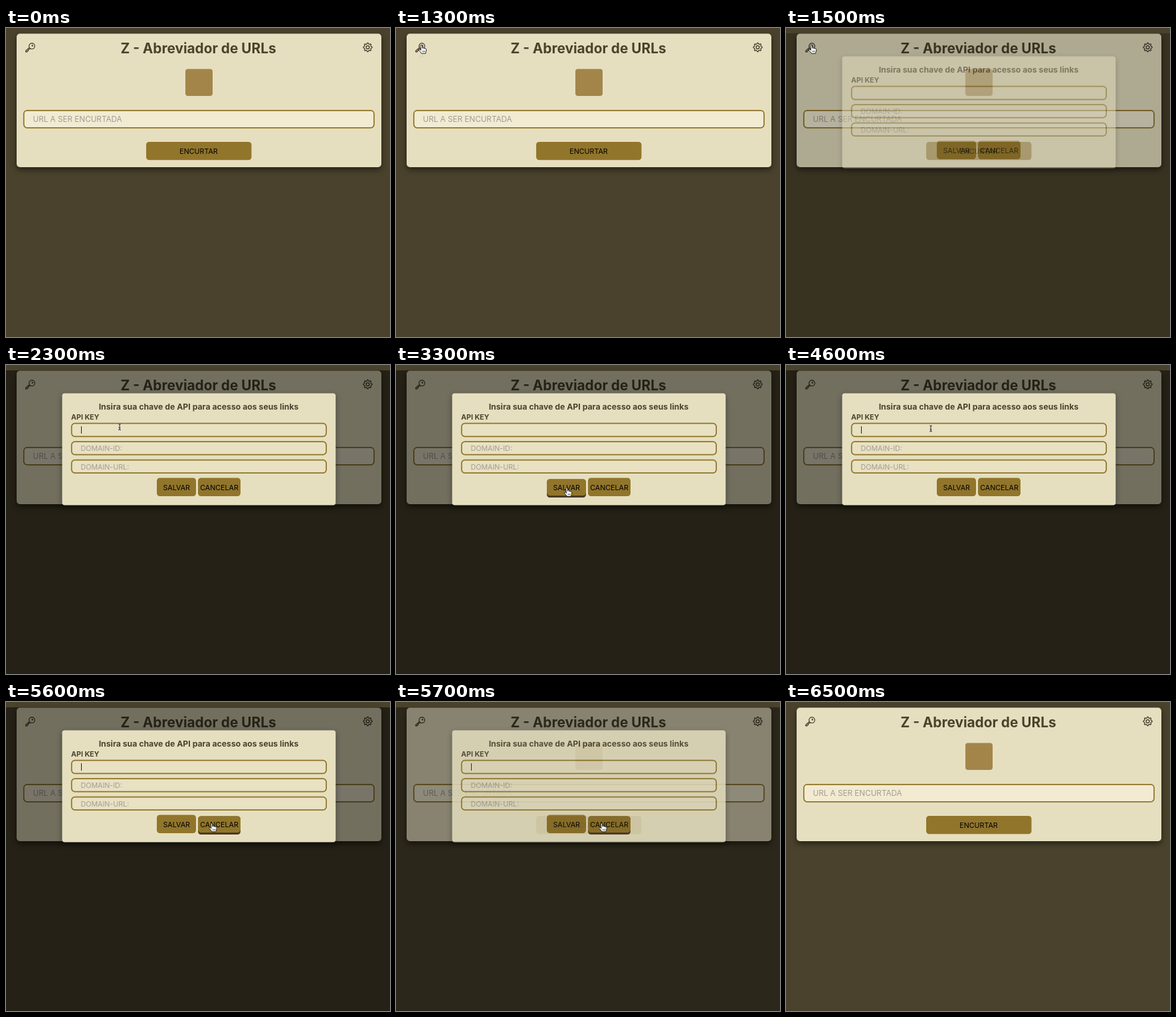
Write an HTML page that moves like this. It is 578 by 464 pixels and loops after 7200 ms.

```html
<!DOCTYPE html>
<html lang="pt">
<head>
<meta charset="utf-8">
<title>Abreviador</title>
<style>
html, body { margin: 0; width: 100%; height: 100%; overflow: hidden; background: #4a422c; }
svg { display: block; width: 578px; height: 464px; font-family: Inter, "Liberation Sans", sans-serif; font-size: 10.7px; }
.card { fill: #e6dfbf; }
#page .card { filter: drop-shadow(0 4px 4px rgba(0,0,0,.5)); }
#modal .card { filter: drop-shadow(0 3px 4px rgba(0,0,0,.4)); }
.field { fill: #e8e1c2; stroke: #8f7428; stroke-width: 1.7; }
.hint { fill: #a19c97; }
.head { fill: #4a422c; font-weight: 700; }
.btn { fill: #91752b; }
.edge { fill: #4a3a24; }
.mid { text-anchor: middle; }
.icon { fill: none; stroke: #3a3424; stroke-width: 1.15; stroke-linejoin: round; stroke-linecap: round; }
</style>
</head>
<body>
<svg viewBox="0 0 578 464">
  <rect width="578" height="464" fill="#4a422c"/>
  <g id="page">
    <rect class="card" x="16" y="8.5" width="549" height="200.5" rx="5"/>
    <text class="head mid" x="289.5" y="37.7" font-size="20.8">Z - Abreviador de URLs</text>
    <g class="icon">
      <circle cx="39" cy="27.2" r="4.3"/>
      <path d="M35.2 29.4L29.7 34.2V35.8H32V34.2H33.6V32.6L36.6 30.9"/>
      <circle cx="39.7" cy="26.5" r=".6"/>
    </g>
    <g class="icon">
      <path id="gear"/>
      <circle cx="544.5" cy="29" r="2.4"/>
    </g>
    <rect x="270" y="61.5" width="41" height="40.5" rx="4" fill="#a3854a"/>
    <rect class="field" x="26.8" y="123.8" width="527.2" height="26" rx="5" style="fill:#f2ebd1"/>
    <text class="hint" x="40.5" y="141.4" font-size="11.7">URL A SER ENCURTADA</text>
    <rect class="btn" x="211" y="171" width="158.5" height="27.3" rx="4.5"/>
    <text class="mid" x="290" y="188.6">ENCURTAR</text>
  </g>
  <rect id="shade" y="8" width="578" height="456"/>
  <g id="modal">
    <rect class="card" x="84.5" y="42.5" width="411.7" height="168" rx="4"/>
    <text class="head mid" x="290" y="67" font-size="12.25">Insira sua chave de API para acesso aos seus links</text>
    <text class="head" x="98" y="82.2">API KEY</text>
    <g id="key">
      <rect id="keyBox" class="field" x="98.7" y="87.7" width="383.4" height="19.6" rx="5"/>
      <text id="error" x="112.7" y="101.4" font-size="10.5" font-weight="500" fill="#33180f">INFORME UMA CHAVE VÁLIDA!</text>
      <path id="caret" d="M113.5 92V103" stroke="#222"/>
    </g>
    <rect class="field" x="98.7" y="115.2" width="383.4" height="19.4" rx="5"/>
    <text class="hint" x="112.5" y="129">DOMAIN-ID:</text>
    <rect class="field" x="98.7" y="142.7" width="383.4" height="19.4" rx="5"/>
    <text class="hint" x="112.5" y="156.6">DOMAIN-URL:</text>
    <g id="save">
      <rect class="edge" x="227" y="171.5" width="59" height="27.5" rx="4.5"/>
      <rect class="btn" x="227" y="169.5" width="59" height="27.5" rx="4.5"/>
      <text class="mid" x="256.7" y="187.5">SALVAR</text>
    </g>
    <g id="cancel">
      <rect class="edge" x="289" y="171.5" width="64" height="27.5" rx="4.5"/>
      <rect class="btn" x="289" y="169.5" width="64" height="27.5" rx="4.5"/>
      <text class="mid" x="321" y="187.5">CANCELAR</text>
    </g>
  </g>
  <text id="tip" class="mid" x="39" y="45" font-size="5" fill="#c9b96a" opacity=".45">API</text>
  <g id="cursor">
    <path id="arrow" d="M0 0V12L2.8 9.5L4.6 13.5L6.4 12.7L4.7 8.8H8.4Z" fill="#111" stroke="#fff" stroke-width=".8"/>
    <g id="hand" fill="#fff" stroke="#111" stroke-width=".9" stroke-linejoin="round">
      <path d="M-1.2 1C-1.2-.4 1-.4 1.1 1L1.5 5C2-.0 3.7 4 3.8 5.4C4.3 4.2 5.7 4.7 5.8 5.9C6.4 5 7.6 5.6 7.6 6.8C7.8 9.5 7 10.5 6.4 12.8H.4C-.4 11-2.5 9.2-3.6 7.6C-4 6.5-2.7 6-1.6 7L-.6 8Z"/>
      <path d="M2 8.5V11M3.7 8.5V11M5.3 8.5V11" stroke-width=".6"/>
    </g>
    <g id="beam" fill="none" stroke-linecap="round">
      <path d="M-1.6-4.6Q0-4.6 0-3.4V3.4Q0 4.6-1.6 4.6M1.6-4.6Q0-4.6 0-3.4M0 3.4Q0 4.6 1.6 4.6M-1 1.2H1" stroke="#fff" stroke-width="2" opacity=".45"/>
      <path d="M-1.6-4.6Q0-4.6 0-3.4V3.4Q0 4.6-1.6 4.6M1.6-4.6Q0-4.6 0-3.4M0 3.4Q0 4.6 1.6 4.6M-1 1.2H1" stroke="#222" stroke-width="1"/>
    </g>
  </g>
</svg>
<script>
const LOOP = 7200, STEP = 100;
const $ = id => document.getElementById(id);
const show = (id, on) => $(id).setAttribute('visibility', on ? 'inherit' : 'hidden');
const move = (id, x, y) => $(id).setAttribute('transform', `translate(${x} ${y})`);
const clamp = v => Math.min(1, Math.max(0, v));
const within = (t, a, b) => t >= a && t < b;

// pointer stops: time, x, y
const stops = [
  [300, 200, 294], [400, 122, 171], [500, 122, 171], [1000, 38, 25.5], [2000, 38, 25.5],
  [2100, 60, 80], [2200, 140, 95], [2300, 171, 93], [2500, 171, 93], [3200, 257, 184.5],
  [3400, 257, 184.5], [4100, 218, 95.5], [4800, 218, 95.5], [5300, 309.5, 182],
  [6300, 309.5, 182], [6400, 462, 32]
];
// hit areas: x1, y1, x2, y2
const keyIcon = [28, 20, 48, 40];
const saveArea = [227, 169, 286, 199];
const cancelArea = [289, 169, 353, 199];
const pageField = [26, 123, 555, 151];
const modalFields = [[98, 87, 483, 108], [98, 115, 483, 135], [98, 142, 483, 163]];
const hit = (p, r) => p[0] >= r[0] && p[0] <= r[2] && p[1] >= r[1] && p[1] <= r[3];

// cubic-bezier(.25, .1, .25, 1)
function ease(x) {
  let lo = 0, hi = 1, s = x;
  for (let i = 0; i < 24; i++) {
    s = (lo + hi) / 2;
    const q = 1 - s;
    if (.75 * q * s + s ** 3 < x) lo = s; else hi = s;
  }
  const q = 1 - s;
  return .3 * q * q * s + 3 * q * s * s + s ** 3;
}

function pointer(t) {
  const i = Math.max(1, stops.findIndex(s => s[0] >= t));
  const a = stops[i - 1], b = stops[i];
  const k = clamp((t - a[0]) / (b[0] - a[0])), e = k * k * (3 - 2 * k);
  return [a[1] + (b[1] - a[1]) * e, a[2] + (b[2] - a[2]) * e];
}

function press(id, on) {
  const [edge, face, label] = $(id).children;
  edge.setAttribute('visibility', on ? 'inherit' : 'hidden');
  face.setAttribute('y', on ? 171.5 : 169.5);
  face.setAttribute('height', on ? 24.5 : 27.5);
  label.setAttribute('y', on ? 188.2 : 187.5);
}

function draw(t) {
  const fade = t < 5600 ? ease(clamp((t - 1300) / 700)) : 1 - ease(clamp((t - 5600) / 700));
  $('shade').setAttribute('opacity', fade * .5);
  $('modal').setAttribute('opacity', fade);

  const failed = within(t, 3400, 4600);
  move('key', failed ? 8 * Math.sin((t - 3400) / 300 * 2 * Math.PI) : 0, 0);
  $('keyBox').style.fill = failed ? '#d96d4b' : '';
  $('keyBox').style.stroke = failed ? '#a5702c' : '';
  show('error', failed);
  const focus = within(t, 2300, 3300) ? 2300 : within(t, 4600, 6300) ? 4600 : -1;
  show('caret', focus > 0 && Math.floor((t - focus) / 500) % 2 === 0);

  const p = pointer(Math.min(t, 6400)), open = within(t, 1300, 6300);
  const onSave = open && hit(p, saveArea), onCancel = open && hit(p, cancelArea);
  press('save', onSave);
  press('cancel', onCancel);
  show('tip', within(t, 1000, 2100));

  const hand = hit(p, keyIcon) || onSave || onCancel || (t >= 6300 && t < 6400);
  const beam = !hand && (open ? modalFields.some(r => hit(p, r)) : hit(p, pageField));
  show('cursor', within(t, 300, 6500));
  move('cursor', p[0], p[1]);
  const on = (id, v) => $(id).setAttribute('display', v ? 'inline' : 'none');
  on('hand', hand);
  on('beam', beam);
  on('arrow', !hand && !beam);
}

// eight-toothed gear outline
let gear = '';
for (let i = 0; i < 32; i++) {
  const r = i % 4 < 2 ? 6.6 : 5, a = (i - .5) * Math.PI / 16;
  gear += (i ? 'L' : 'M') + (544.5 + r * Math.cos(a)).toFixed(2) + ' ' + (29 + r * Math.sin(a)).toFixed(2);
}
$('gear').setAttribute('d', gear + 'Z');

const start = performance.now();
function tick() {
  const t = (performance.now() - start) % LOOP;
  draw(Math.floor(t / STEP) * STEP);
  requestAnimationFrame(tick);
}
draw(0);
requestAnimationFrame(tick);
</script>
</body>
</html>
```
